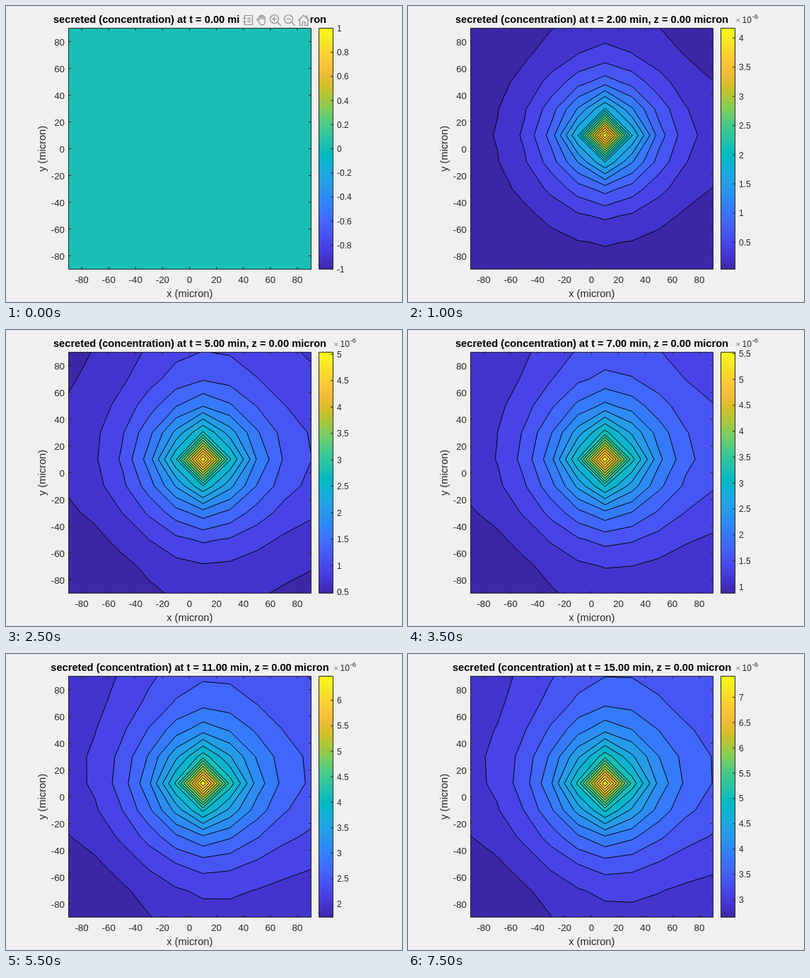
An HTML page for the animation above (8000 ms loop, 560 px wide and 420 px high).

```html
<!DOCTYPE html>
<html lang="en">
<head>
<meta charset="utf-8">
<title>Secreted concentration</title>
<style>
  html, body { margin: 0; width: 100%; height: 100%; overflow: hidden; background: #f0f0f0; }
  svg { display: block; width: 560px; height: 420px; font: 13.333px "Liberation Sans", Arial, sans-serif; fill: #262626; }
  .mid { text-anchor: middle; }
  .end { text-anchor: end; }
  .label { font-size: 14.667px; text-anchor: middle; }
  #title { font-weight: bold; fill: #000; }
  .small { font-size: 12px; }
  .line { fill: none; stroke: #262626; stroke-width: 1; }
  #lines { fill: none; stroke: #000; stroke-width: 1; stroke-linejoin: round; }
  #tools g { fill: none; stroke: #8c8c8c; stroke-width: 1.2; stroke-linecap: round; stroke-linejoin: round; }
</style>
</head>
<body>
<svg viewBox="0 0 560 420">
  <defs><linearGradient id="map" x1="0" y1="1" x2="0" y2="0"></linearGradient></defs>
  <rect width="560" height="420" fill="#f0f0f0"/>
  <g id="bands"></g>
  <path id="lines"/>
  <path id="axes" class="line"/>
  <g id="axisText"></g>
  <text class="label" x="259.8" y="413">x (micron)</text>
  <text class="label" transform="translate(56 202.5) rotate(-90)">y (micron)</text>
  <rect x="442.5" y="31.5" width="20" height="342" fill="url(#map)"/>
  <path id="barTicks" class="line"/>
  <g id="barText" class="small"></g>
  <g id="power" class="small">
    <text x="463.5" y="24" font-size="11" fill="#777">×</text>
    <text x="472.5" y="24">10</text>
    <text x="486.5" y="18" font-size="9.6">-6</text>
  </g>
  <text id="title" class="label" x="260" y="24"></text>
  <g id="tools">
    <rect x="331" y="10" width="99.5" height="20" fill="#f0f0f0"/>
    <g>
      <path d="M337.5 13.5h11v13h-11zM335.5 17.5h3M335.5 22.5h3M341.5 17.5h4M341.5 20h4M341.5 22.5h4"/>
      <path d="M357.5 22.5l-2.8-3.2q.8-1.6 2.3-.4l1 1v-5q1-1.6 2 0v3-4.6q1-1.6 2 0v4.6-3.8q1.1-1.5 2.1 0v4.6-2.6q1.2-1.4 2.2 0v5.4q0 5.5-4.6 5.5-2.7 0-4.2-4.5z"/>
      <circle cx="379.5" cy="18.5" r="6"/>
      <path d="M384 23l4.5 4.5M376.5 18.5h6M379.5 15.5v6"/>
      <circle cx="399.5" cy="18.5" r="6"/>
      <path d="M404 23l4.5 4.5M396.5 18.5h6"/>
      <path d="M413.5 20.5l7.5-7.5 7.5 7.5M415.5 19v8.5h4v-5h3.5v5h4v-8.5M425.5 17v-3.5"/>
    </g>
  </g>
</svg>
<script>
const NS = 'http://www.w3.org/2000/svg';
const $ = id => document.getElementById(id);
const L = 88, T = 31.5, W = 343, H = 342;
const N = 10, SOURCE = 5, RATE = 23.43, DT = 0.01, LEVELS = 20;
const STEP_MS = 500, STEPS = 16;
const palette = ('3e26a8 4332cb 4741e5 4852f4 4563fd 3875fe 2e87f7 2797eb 20a5e3 12b1d6 02bac3 ' +
  '24c1ae 37c897 57cc7a 81cc59 abc739 d1bf27 f0ba36 fec338 fad62d f5e924 f9fb15').split(' ');

function add(parent, tag, attrs, text) {
  const el = document.createElementNS(NS, tag);
  for (const k in attrs) el.setAttribute(k, attrs[k]);
  if (text !== undefined) el.textContent = text;
  parent.append(el);
  return el;
}

function color(f) {
  const p = f * (palette.length - 1), i = Math.min(Math.floor(p), palette.length - 2);
  const part = (n, c) => parseInt(palette[n].substr(c * 2, 2), 16);
  return 'rgb(' + [0, 1, 2].map(c =>
    Math.round(part(i, c) + (part(i + 1, c) - part(i, c)) * (p - i))) + ')';
}

// Cosine modes of diffusion from one voxel in a closed square,
// advanced by implicit steps split into x and y
const mode = (p, i) => Math.cos(p * Math.PI * (i + 0.5) / N);
const damp = p => 1 / (1 + DT * 5 * (1 - Math.cos(p * Math.PI / N)));
const weight = p => (p ? 2 : 1) / N * mode(p, SOURCE);

function field(t) {
  const amp = [];
  for (let p = 0; p < N; p++) for (let q = 0; q < N; q++) {
    const g = damp(p) * damp(q);
    const sum = p + q ? DT * g * (1 - g ** (t / DT)) / (1 - g) : t;
    amp.push(RATE * weight(p) * weight(q) * sum);
  }
  return Array.from({ length: N }, (_, j) => Array.from({ length: N }, (_, i) =>
    amp.reduce((s, a, n) => s + a * mode(Math.floor(n / N), i) * mode(n % N, j), 0)));
}

const px = f => L + W * f;
const py = f => T + H * (1 - f);
const pos = p => px(p[0] / (N - 1)).toFixed(2) + ' ' + py(p[1] / (N - 1)).toFixed(2);

// Part of every grid cell above the level, and the cut lines
function contour(u, level) {
  let area = '', cuts = '';
  for (let j = 0; j < N - 1; j++) for (let i = 0; i < N - 1; i++) {
    const quad = [[i, j], [i + 1, j], [i + 1, j + 1], [i, j + 1]];
    const poly = [], cross = [];
    quad.forEach((a, n) => {
      const b = quad[(n + 1) % 4], va = u[a[1]][a[0]], vb = u[b[1]][b[0]];
      if (va >= level) poly.push(a);
      if ((va >= level) !== (vb >= level)) {
        const f = (level - va) / (vb - va);
        const c = [a[0] + (b[0] - a[0]) * f, a[1] + (b[1] - a[1]) * f];
        poly.push(c);
        cross.push({ c, out: va >= level });
      }
    });
    if (poly.length > 2) area += 'M' + poly.map(pos).join('L') + 'Z';
    cross.forEach((k, n) => {
      if (k.out) cuts += 'M' + pos(k.c) + 'L' + pos(cross[(n + 1) % cross.length].c);
    });
  }
  return { area, cuts };
}

function drawBar(lo, hi, step) {
  let d = `M442.5 ${T}h20v${H}h-20z`;
  $('barText').replaceChildren();
  for (let n = Math.ceil(lo / step); n <= Math.floor(hi / step); n++) {
    const y = py((n * step - lo) / (hi - lo));
    d += `M462.5 ${y}h-3.5`;
    add($('barText'), 'text', { x: 468, y: y + 4.5 }, +(n * step).toFixed(1));
  }
  $('barTicks').setAttribute('d', d);
}

function draw(t) {
  $('title').textContent = `secreted (concentration) at t = ${t.toFixed(2)} min, z = 0.00 micron`;
  $('tools').style.display = t < 2 ? '' : 'none';
  $('power').style.display = t ? '' : 'none';
  const bands = $('bands');
  bands.replaceChildren();
  add(bands, 'rect', { x: L, y: T, width: W, height: H, fill: color(t ? 0 : 32 / 63) });
  let cuts = '';
  if (t) {
    const u = field(t), all = u.flat();
    const lo = Math.min(...all), hi = Math.max(...all);
    for (let n = 1; n < LEVELS; n++) {
      const c = contour(u, lo + (hi - lo) * n / LEVELS);
      add(bands, 'path', { d: c.area, fill: color(n / LEVELS) });
      cuts += c.cuts;
    }
    drawBar(lo, hi, 0.5);
  } else {
    drawBar(-1, 1, 0.2);
  }
  $('lines').setAttribute('d', cuts);
}

palette.forEach((c, i) =>
  add($('map'), 'stop', { offset: i / (palette.length - 1), 'stop-color': '#' + c }));

const left = L + 0.5, right = left + W, bottom = T + H;
let frame = `M${left} ${T}H${right}V${bottom}H${left}z`;
for (let v = -80; v <= 80; v += 20) {
  const f = (v + 90) / 180, x = px(f), y = py(f);
  frame += `M${x} ${T}v3.5M${x} ${bottom}v-3.5M${left} ${y}h3.5M${right} ${y}h-3.5`;
  add($('axisText'), 'text', { class: 'mid', x, y: 393 }, v);
  add($('axisText'), 'text', { class: 'end', x: 83, y: y + 5.6 }, v);
}
$('axes').setAttribute('d', frame);

let shown = -1;
function tick() {
  const step = Math.floor(performance.now() / STEP_MS) % STEPS;
  if (step !== shown) draw(shown = step);
  requestAnimationFrame(tick);
}
tick();
</script>
</body>
</html>
```
